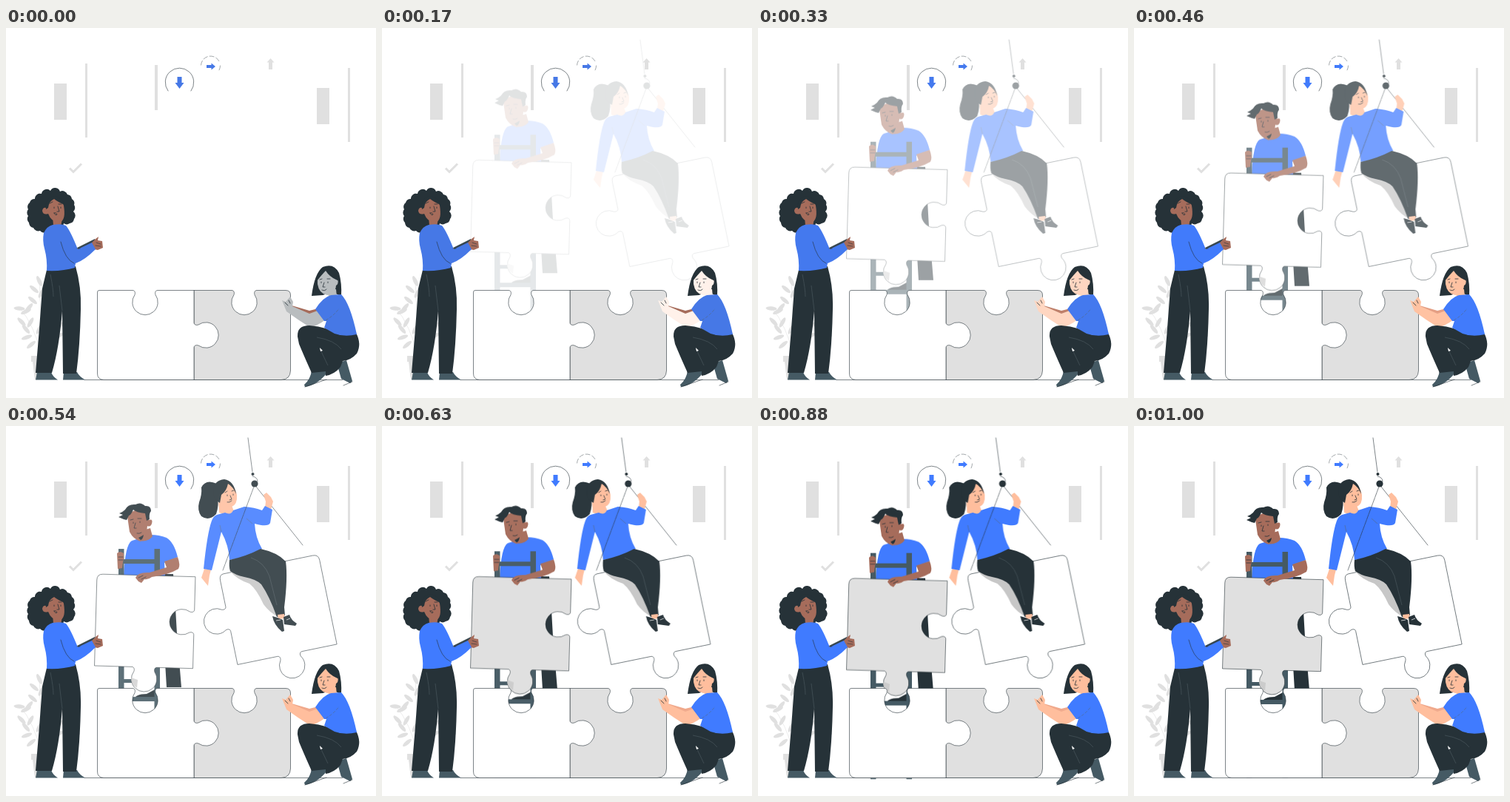
An HTML page that plays this animation: 500x500 px, repeating every 1040 ms.

```html
<!DOCTYPE html>
<html lang="en">
<head>
<meta charset="utf-8">
<title>Puzzle team</title>
<style>
  html, body { margin: 0; width: 100%; height: 100%; overflow: hidden; background: #fff; }
  svg { display: block; width: 100vw; height: 100vh; --blue: #407bff; --skin: #ffbe9d; --panel: #e0e0e0; --far: #f0a98c; }
  .grey { fill: #e0e0e0; }
  .white { fill: #fff; }
  .dark { fill: #263238; }
  .shoe { fill: #455a64; }
  .blue { fill: var(--blue); }
  .solid { fill: #407bff; }
  .peach { fill: #ffbe9d; }
  .skin { fill: var(--skin); }
  .far { fill: var(--far); }
  .brown { fill: #a66c5b; }
  .panel { fill: var(--panel); }
  .line { stroke: #263238; stroke-width: .6; stroke-linejoin: round; }
  .thin { fill: none; stroke: #263238; stroke-width: .6; stroke-linecap: round; stroke-linejoin: round; }
  .seam { fill: none; stroke: #56646b; stroke-width: .5; }
  .feature { fill: none; stroke: #263238; stroke-width: .8; stroke-linecap: round; }
</style>
</head>
<body>
<svg viewBox="0 0 500 500" xmlns="http://www.w3.org/2000/svg">
  <!-- backdrop -->
  <g class="grey">
    <path d="M65 75h17v49h-17zM107 48h3v100h-3zM201 50h4v61h-4zM420 81h17v49h-17zM462 54h3v100h-3z"/>
    <path d="M357.500 41l5 5.500h-2.500v9.500h-5v-9.500h-2.500z"/>
    <path d="M86 189.500l5 5 11-11" fill="none" stroke="#e0e0e0" stroke-width="3"/>
  </g>
  <path class="thin" d="M219 85A19.300 19.300 0 1 1 250 85"/>
  <path class="blue" d="M231.500 66h6v8h3l-6 8-6-8h3z"/>
  <path class="thin" d="M263.500 50A13 13 0 0 1 288 45M289.500 51A13 13 0 0 1 288 57" stroke-dasharray="6 3" opacity=".7"/>
  <path class="blue" d="M271 50h6.500v-2.500l5.500 4.500-5.500 4.500v-2.500h-6.500z"/>
  <g id="plant" class="grey">
    <path d="M49 444Q37 400 20 380M50 444Q47 390 45 340M50 444Q60 410 74 385" fill="none" stroke="#e6e6e6" stroke-width=".7"/>
    <path d="M34 443h31v8h-2l-3 24h-21l-3-24h-2z"/>
  </g>

  <!-- man on the ladder -->
  <g id="man">
    <path class="dark" d="M190 204H226L229 250 231 285 237 357H217L213 290z"/>
    <path class="dark" d="M172 375Q174 366 190 366L205 358 206 376z"/>
    <path class="solid" d="M170 159Q161 164 159 206H215L214 189 232 181Q227 161 217 155 207 151 196 151z"/>
    <path class="brown" d="M181 146L195 142 198 153Q192 161 180 159z"/>
    <path class="shoe" d="M152 170h7.500v14H200.500V170H208V475.500H200.500V376H159.500V475.500H152zM159.500 190V346H200.500V190zM159.500 351V370H200.500V351z" fill-rule="evenodd"/>
    <path class="brown" d="M164 126Q169 116 190 116L193 131Q199 129 197 136 195 141 191 139 190 155 182 160 172 157 167 147z"/>
    <path class="dark" d="M152 127L158 124 153 122Q158 120 161 117 165 109 175 110 182 106 188 112 196 111 196 119 193 122 194 130L190 132 188 122Q176 121 172 117 169 124 166 125L163 131 159 130z"/>
    <path class="feature" d="M168 131l4-1M178 129l5 0M172 134v1.500M181 133v1.500M175 135l-2 7 3 0M177 149q3 1 6-1"/>
    <path class="dark" d="M179 155q4-2 7-4-1 6-4 7z"/>
    <path class="brown" d="M150 176q4-4 9 0l0 8-1 4-1 8-6 1z"/>
    <path class="feature" d="M152 181h6M152 185h6" stroke-width=".5"/>
    <g transform="translate(123 204) rotate(1.600)">
      <path class="panel line" d="M8 0H133V44.500c0 3-3 4-6 3a17.200 17.200 0 1 0 0 28c3-1 6 0 6 3V124H84.500c-3 0-4 3-3 6a17.200 17.200 0 1 1-28 0c1-3 0-6-3-6H0V8Q0 0 8 0z"/>
    </g>
    <path d="M169 344l9 3-1 11q-9-5-8-14z" fill="#c7c7c7" opacity=".8"/>
    <path class="brown" d="M214 187L232 181Q236 192 233 197 220 205 197 208 192 212 187 211L183 216 179 214 175 209Q178 201 194 202L217 195z"/>
    <path class="feature" d="M179 209l6-3M183 211l6-3" stroke-width=".5"/>
  </g>

  <!-- woman on the hoisted piece -->
  <g id="swing">
    <g transform="translate(284 201) rotate(-11.600)">
      <path class="white line" d="M6 0H129Q137 0 137 8V124H89c-3 0-4 3-3 6a17.200 17.200 0 1 1-28 0c1-3 0-6-3-6H0V78c0-3-3-4-6-3a17.200 17.200 0 1 1 0-28c3 1 6 0 6-3V8Q0 0 6 0z"/>
    </g>
    <path d="M298 195Q307 207 325 213 335 221 344 241 352 252 364 258L368 240 340 200z" fill="#c7c7c7"/>
    <path class="thin" d="M323 16L329 62M334 82L397 161"/>
    <path class="dark" d="M281 78Q266 71 260 83 261 92 257 103 254 114 260 122 270 129 280 119 284 108 282 94z"/>
    <path class="peach" d="M283 99L300 105 304 115 296 121 284 117z"/>
    <path class="peach" d="M282 90Q284 77 297 77 306 82 308 93 309 106 301 109 289 109 283 98z"/>
    <path class="dark" d="M276 88Q277 73 291 72 304 74 307 92 303 82 296 78 294 88 287 93L285 104Q276 99 276 88z"/>
    <path class="feature" d="M292 90l3-2M301 88l3-1M295 93v1.500M303 92v1.500M299 94l2 5-3 1M295 103q3 1 6-2"/>
    <path class="peach" d="M264 193L273 194 271 202 269 216 264 210 260 205z"/>
    <path class="peach" d="M346 111L347 102 344 93 348 90 354 96 357 102 354 113z"/>
    <path class="solid" d="M281 120L292 117Q300 121 303 114L318 109Q332 110 342 114L346 108 356 113 353 131Q350 137 332 132 333 151 342 166 323 177 298 181 297 161 287 143L274 195 263 193Q268 144 274 128 276 122 281 120z"/>
    <path class="dark" d="M298 181Q321 176 340 166 363 171 374 183 377 205 372 245L373 256 362 258Q352 230 341 214 334 207 318 204 305 201 299 196 297 190 298 181z"/>
    <path class="seam" d="M327 178Q345 184 352 203L362 242M329 132l-8-7M287 143l-2-9"/>
    <path class="peach" d="M363 255l9-1 1 6-9 1z"/>
    <path class="dark" d="M356 257L363 259 370 262 372 277 369 278Q358 269 356 257zM371 258L379 255Q381 262 389 267L387 270 372 268z"/>
    <path d="M361 263l6-1M375 262l5-2" stroke="#fff" stroke-width=".7"/>
    <path class="thin" d="M331 82L289 195" stroke-dasharray="7 1"/>
    <circle class="dark" cx="329.500" cy="65" r="2"/>
    <path class="thin" d="M329 68q7 1 7 7"/>
    <circle class="dark" cx="332" cy="78" r="4.600"/>
  </g>

  <!-- lower pieces -->
  <path class="thin" d="M106 475.500H455"/>
  <path class="grey line" d="M254 354.500H305c3 0 4 3 3 6a17.200 17.200 0 1 0 28 0c-1-3 0-6 3-6H378Q384.500 354.500 384.500 361V463Q384 475 372 475.500H254z"/>
  <path class="white line" d="M126 354.500H171c3 0 4 3 3 6a17.200 17.200 0 1 0 28 0c-1-3 0-6 3-6H254V398c0 3 3 4 6 3a17.200 17.200 0 1 1 0 28c-3-1-6 0-6 3V475.500H132Q123.500 475 123.500 467V357Q123.500 354.500 126 354.500z"/>

  <!-- standing woman -->
  <path id="curls" class="dark"/>
  <path class="brown" d="M63 255L76 258 74 268 64 267z"/>
  <path class="brown" d="M54 243Q56 232 66 230 77 232 78 240 81 258 74 262 62 264 57 251 50 253 49 247 50 242 54 243z"/>
  <path class="dark" d="M54 245Q52 230 64 227 76 228 79 239 70 235 65 231 58 234 57 243z"/>
  <path class="feature" d="M59 237l4-2M71 238l4 0M65 242v1.500M74 242v1.500M70 241l2 7-3 0M65 250q3-1 4 2-2 2-4-2"/>
  <path class="shoe" d="M42 465H61Q63 471 70 475.500H40zM78 465H96Q99 471 107 475.500H77z"/>
  <path class="dark" d="M55 327L94 322Q102 350 101 380 100 430 95 467H77L76 382Q72 432 62 466H40Q45 410 49 352z"/>
  <path class="seam" d="M60 333q4 20 4 30M76 382l-4-34"/>
  <path d="M96 297L120 285 122 290 100 302z" fill="#37474f"/>
  <path class="brown" d="M115 291L121 285 125 282 124 287 130 288 131 297 124 300 119 299z"/>
  <path class="blue" d="M63 266Q75 264 81 267 87 274 97 299L116 290 121 299Q106 314 94 318L93 324Q76 329 55 328 56 313 52 298 49 287 51 277 55 268 63 266z"/>
  <path class="thin" d="M74 289Q80 313 92 318M96 298l4 0M122 290l6 2M121 294l7 1" stroke-width=".9"/>

  <!-- crouching woman -->
  <path class="dark" d="M413 362Q417 331 428 323 443 317 450 331 454 345 453 362L440 357 428 361z"/>
  <path class="skin" d="M434 354L446 353 447 363 437 367z"/>
  <path class="skin" d="M421 340Q425 328 434 326 444 328 448 338 450 346 446 348 445 360 434 361 423 359 421 346z"/>
  <path class="dark" d="M420 342Q423 323 438 323 450 326 450 342L446 340Q437 336 432 328 427 333 420 342z"/>
  <path class="feature" d="M424 340l3-1M434 339l4 0M426 343v1.500M435 343v1.500M430 344l-2 6 3 0M427 354q4 2 6-1"/>
  <path class="far" d="M386 375L410 382 422 379 421 389 409 388 388 380z"/>
  <path class="skin" d="M373 368L378 370 384 363 388 370 387 376 410 386 421 382 432 394Q419 404 410 404 394 394 379 383z"/>
  <path class="feature" d="M377 371l4 4M382 368l2 4" stroke-width=".5"/>
  <path class="shoe" d="M413 462L432 460 434 466Q420 483 404 485L403 482Q412 474 413 462zM447 453L460 449 468 477 465 480 453 474z"/>
  <path class="dark" d="M394 417Q393 402 410 402 435 404 452 415L473 412Q481 427 474 440 466 449 455 450L452 458Q444 468 432 470L432 464 413 466Q403 444 396 427z"/>
  <path class="seam" d="M420 418q24 4 33 16M424 433l11 23"/>
  <path class="white" d="M424 432l4 4-3 1z"/>
  <path class="blue" d="M418 380Q428 364 439 361L453 360Q465 372 474 414 458 418 444 413L430 405 433 396 430 396z"/>
  <path class="seam" d="M432 395q12-7 18-16" stroke-dasharray="4 2"/>
  <path class="thin" d="M404 485L433 475M456 483L468 478" stroke-width=".5"/>
</svg>
<script>
const LOOP = 1040, FPS = 24;
const svg = document.querySelector('svg');
const byId = id => document.getElementById(id);
const clamp = v => Math.min(1, Math.max(0, v));

// Hair outline: round bumps between a few points
const bumps = '39,231 48,224 60,220 73,221 83,225 89,231 92,239 91,248 92,258 86,264 78,264 66,268 57,274 46,274 37,270 31,263 30,254 30,245 32,236 39,231'.split(' ');
byId('curls').setAttribute('d', 'M' + bumps.join('A7 7 0 0 1 '));

const leaves = [
  [18, 379, 5], [27, 383, -25], [31, 378, -50], [21, 397, 45], [27, 407, 50], [33, 398, -60],
  [45, 342, 65], [38, 353, 40], [48, 358, -60], [36, 368, 40], [28, 418, -20], [34, 428, -40],
  [45, 407, -60], [72, 388, -60], [73, 402, -35], [71, 416, -25]
];
for (const [x, y, turn] of leaves) {
  const leaf = document.createElementNS(svg.namespaceURI, 'ellipse');
  leaf.setAttribute('rx', 7.5);
  leaf.setAttribute('ry', 2.7);
  leaf.setAttribute('transform', `translate(${x} ${y}) rotate(${turn})`);
  byId('plant').append(leaf);
}

function slideIn(id, from) {
  const anim = byId(id).animate(
    [{ opacity: 0, transform: `translate(${from})` }, { opacity: 1, transform: 'translate(0px, 0px)' }],
    { duration: 1000, easing: 'cubic-bezier(.36, -.01, .5, 1.38)', fill: 'both' });
  anim.pause();
  return anim;
}
const slides = [slideIn('man', '0px, -30px'), slideIn('swing', '30px, 0px')];

const mix = (to, amount, from) => `color-mix(in srgb, ${to} ${amount * 100}%, ${from})`;

function draw(time) {
  const step = Math.floor((time % LOOP + 4) * FPS / 1000);
  for (const anim of slides) anim.currentTime = step ? step * 1000 / FPS + 30 : 0;

  // The palette warms up while the newcomers fade in
  const warm = clamp((step - 2) * .105);
  const vivid = clamp((step - 6) / 6);
  const set = (name, value) => svg.style.setProperty(name, value);
  set('--skin', step < 4 ? '#b9bdbf' : mix('#ffbe9d', warm, 'white'));
  set('--far', mix('#f0a98c', vivid, '#a66c5b'));
  set('--blue', mix('#407bff', vivid, '#4678e6'));
  set('--panel', step < 14 ? '#fff' : '#e0e0e0');
}

const start = performance.now();
function tick() {
  draw(performance.now() - start);
  requestAnimationFrame(tick);
}
tick();
</script>
</body>
</html>
```
